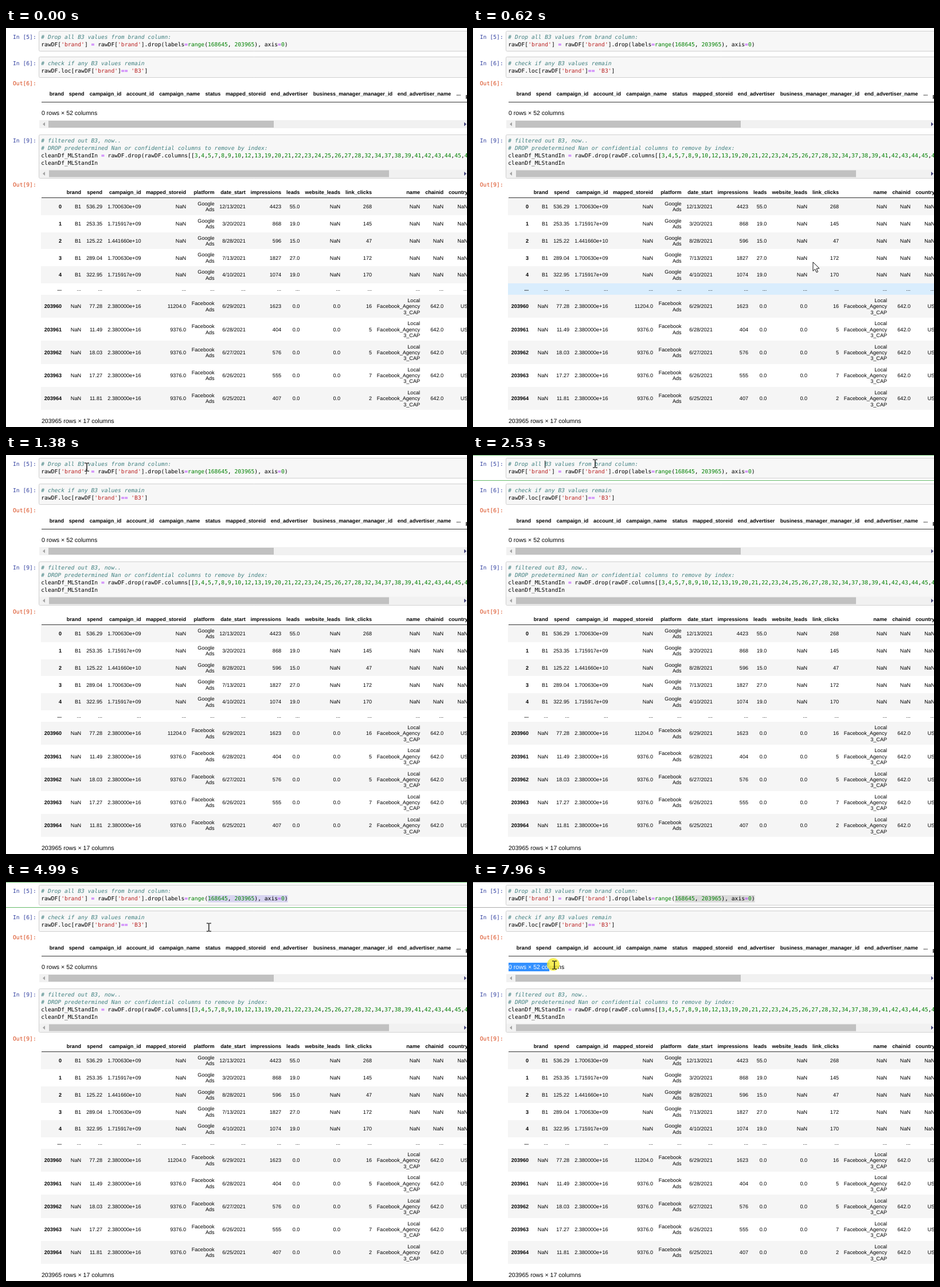
Write an HTML page with a canvas that moves like this. It is 804 px wide and 697 px high and loops after 8 s.

```html
<!DOCTYPE html>
<html lang="en">
<head>
<meta charset="utf-8">
<title>Notebook</title>
<style>
  html, body { margin: 0; width: 100%; height: 100%; overflow: hidden; background: #fff; }
  canvas { display: block; }
</style>
</head>
<body>
<canvas id="stage" width="804" height="697"></canvas>
<script>
const ctx = document.getElementById('stage').getContext('2d');
const W = 804, H = 697, LOOP = 8000;
const MONO = '9.67px "DejaVu Sans Mono", monospace';
const SANS = '"Liberation Sans", Arial, sans-serif';
const CELL = '9.08px ' + SANS, HEAD = 'bold ' + CELL, NOTE = '10.57px ' + SANS;
const CODE_X = 61.3, CODE_LEN = 74;
const FOCUS = 2190, DRAG = 3710, DROP = 4580, BLUR = 7480;

// Pointer path: time, x, y
const path = [
  [480, 720, 650], [550, 655, 525], [620, 594, 410], [760, 450, 260], [960, 240, 90],
  [1250, 141, 20], [1380, 141, 21], [1860, 126, 13], [2190, 126, 13], [2880, 302, 17],
  [3010, 302, 17], [3510, 531, 29], [3840, 531, 29], [4120, 131, 25], [4330, 320, 24],
  [4450, 353, 25], [4580, 353, 25], [4700, 376, 40], [4830, 385, 62], [4990, 354, 79],
  [5260, 300, 77], [5410, 298, 76], [5880, 298, 76], [6350, 38, 130], [6620, 38, 130],
  [6950, 67, 146], [7680, 66, 146], [7960, 142, 145]
];

const summary = {
  names: 'brand spend campaign_id account_id campaign_name status mapped_storeid end_advertiser business_manager_manager_id end_advertiser_name ...'.split(' '),
  right: [101, 136.5, 201.3, 258, 338.4, 374.3, 453, 526.4, 674, 776, 793]
};
const table = {
  names: ' brand spend campaign_id mapped_storeid platform date_start impressions leads website_leads link_clicks name chainid country'.split(' '),
  right: [97, 131, 168, 235.5, 314, 363.6, 417.7, 480, 512.3, 583, 638, 722, 763, 805.3]
};

const topRow = s => {
  const [id, spend, campaign, date, views, leads, clicks] = s.split(' ');
  return [id, 'B1', spend, campaign, 'NaN', 'Google\nAds', date, views, leads, 'NaN', clicks, 'NaN', 'NaN', 'NaN'];
};
const endRow = s => {
  const [id, spend, store, date, views, clicks] = s.split(' ');
  return [id, 'NaN', spend, '2.380000e+16', store, 'Facebook\nAds', date, views, '0.0', '0.0', clicks,
    'Local\nFacebook_Agency\n3_CAP', '642.0', 'US'];
};
const rows = [
  ...[
    '0 536.29 1.700630e+09 12/13/2021 4423 55.0 268',
    '1 253.35 1.715917e+09 3/20/2021 868 19.0 145',
    '2 125.22 1.441660e+10 8/28/2021 596 15.0 47',
    '3 289.04 1.700630e+09 7/13/2021 1827 27.0 172',
    '4 322.95 1.715917e+09 4/10/2021 1074 19.0 170'
  ].map(topRow),
  Array(14).fill('...'),
  ...[
    '203960 77.28 11204.0 6/29/2021 1623 16',
    '203961 11.49 9376.0 6/28/2021 404 5',
    '203962 18.03 9376.0 6/27/2021 576 5',
    '203963 17.27 9376.0 6/26/2021 555 7',
    '203964 11.81 9376.0 6/25/2021 407 2'
  ].map(endRow)
];
const rowTop = i => i < 6 ? 297 + 29.8 * i : 466 + 40.2 * (i - 6);

function rect(x, y, w, h, color) {
  ctx.fillStyle = color;
  ctx.fillRect(x, y, w, h);
}

function text(s, x, y, font, color = '#000', align = 'left') {
  ctx.font = font;
  ctx.fillStyle = color;
  ctx.textAlign = align;
  ctx.fillText(s, x, y);
}

function shape(points, fill, stroke) {
  ctx.beginPath();
  points.forEach(([x, y]) => ctx.lineTo(x, y));
  ctx.closePath();
  ctx.fillStyle = fill;
  ctx.fill();
  if (stroke) {
    ctx.strokeStyle = stroke;
    ctx.stroke();
  }
}

function box(y, h) {
  ctx.beginPath();
  ctx.roundRect(57.5, y + .5, 800, h - 1, 2);
  ctx.fillStyle = '#f7f7f7';
  ctx.fill();
  ctx.strokeStyle = '#cfcfcf';
  ctx.stroke();
}

function tokenColor(s) {
  if (s[0] === '#') return '#408080';
  if (s[0] === "'") return '#ba2121';
  if (s[0] === '=') return '#aa22ff';
  return /^\d|^range$/.test(s) ? '#008000' : '#000';
}

function code(line, y) {
  let x = CODE_X;
  for (const s of line.match(/#.*|'[^']*'|\d+|=+|range|[a-z_]+|[^\w'=]+/gi)) {
    const font = s[0] === '#' ? 'italic ' + MONO : MONO;
    text(s, x, y, font, tokenColor(s));
    x += ctx.measureText(s).width;
  }
}

function charWidth() {
  ctx.font = MONO;
  return ctx.measureText('0').width;
}

function scrollbar(y, x, w) {
  rect(58, y, W, 14, '#f1f1f1');
  rect(x, y + 1, w, 12, '#c1c1c1');
  shape([[64, y + 7], [68, y + 3.5], [68, y + 10.5]], '#a3a3a3');
  shape([[803, y + 7], [799, y + 3.5], [799, y + 10.5]], '#45457c');
}

function pointerAt(t) {
  if (t < path[0][0]) return null;
  const i = path.findIndex(p => p[0] > t);
  if (i < 0) return path[path.length - 1].slice(1);
  const [t0, x0, y0] = path[i - 1], [t1, x1, y1] = path[i];
  const k = (t - t0) / (t1 - t0);
  return [x0 + (x1 - x0) * k, y0 + (y1 - y0) * k];
}

function firstCell(t, lag) {
  if (t >= FOCUS) {
    const edge = t < BLUR ? '#66bb6a' : '#ababab';
    rect(0, 0, W, 1, edge);
    rect(0, 44, W, 1, edge);
  }
  box(5, 36);
  const cw = charWidth(), end = CODE_X + CODE_LEN * cw;
  if (t >= DRAG) {
    const x = t < DROP ? lag[0] : 353;
    const from = CODE_X + Math.min(CODE_LEN, Math.floor((x - CODE_X) / cw)) * cw;
    if (from < end) rect(from, 23, end - from, 12.5, t < BLUR ? '#d7d4f0' : '#d9d9d9');
    else rect(end, 23, 1, 12.5, '#000');
  } else if (t >= FOCUS && t < FOCUS + 530) {
    rect(CODE_X + 11 * cw, 10, 1, 12.5, '#000');
  }
  prompt('In [5]:', 19, '#303f9f');
  code('# Drop all B3 values from brand column:', 19);
  code("rawDF['brand'] = rawDF['brand'].drop(labels=range(168645, 203965), axis=0)", 32);
}

function prompt(s, y, color) {
  text(s, 12, y, MONO, color);
}

function secondCell(t, pos, lag) {
  box(50, 37);
  prompt('In [6]:', 65.3, '#303f9f');
  code('# check if any B3 values remain', 65.3);
  code("rawDF.loc[rawDF['brand']== 'B3']", 77.8);

  if (pos && pos[0] < 57 && pos[1] > 87 && pos[1] < 177) {
    ctx.beginPath();
    ctx.roundRect(12.5, 88, 44, 88.5, 4);
    ctx.fillStyle = 'rgba(240,240,240,.5)';
    ctx.fill();
    ctx.strokeStyle = '#8c8c8c';
    ctx.stroke();
  }
  prompt('Out[6]:', 100.3, '#d84315');
  summary.names.forEach((s, i) => text(s, summary.right[i], 118.2, HEAD, '#000', 'right'));
  text('p', 801.5, 122, HEAD);
  rect(62, 129, W, 1, '#333');

  const note = '0 rows × 52 columns';
  text(note, 62, 152, NOTE);
  if (t >= BLUR + 200) {
    ctx.save();
    ctx.beginPath();
    ctx.rect(62, 141, lag[0] - 63, 15);
    ctx.clip();
    rect(62, 141, 200, 15, '#3390ff');
    text(note, 62, 152, NOTE, '#fff');
    ctx.restore();
  }
  scrollbar(161, 74, 393);
}

function thirdCell() {
  box(186, 77);
  prompt('In [9]:', 200.3, '#303f9f');
  code('# filtered out B3, now..', 200.3);
  code('# DROP predetermined Nan or confidential columns to remove by index:', 213.3);
  code('cleanDf_MLStandIn = rawDF.drop(rawDF.columns[[3,4,5,7,8,9,10,12,13,19,20,21,22,23,24,25,26,27,28,32,34,37,38,39,41,42,43,44,45,46', 226.3);
  code('cleanDf_MLStandIn', 239);
  scrollbar(247.5, 75, 593);
}

function dataTable(lag) {
  prompt('Out[9]:', 277.3, '#d84315');
  table.names.forEach((s, i) => text(s, table.right[i], 290.2, HEAD, '#000', 'right'));
  rect(62, 296, W, 1, '#333');
  rows.forEach((row, i) => {
    const y0 = rowTop(i), y1 = rowTop(i + 1);
    const hover = lag && lag[0] > 61 && lag[1] >= y0 && lag[1] < y1;
    const top = Math.round(y0);
    if (hover || i % 2 === 0) rect(61, top, W, Math.round(y1) - top, hover ? '#d9edfd' : '#f5f5f5');
    row.forEach((s, c) => {
      const lines = s.split('\n');
      const y = (y0 + y1) / 2 + 3.3 - (lines.length - 1) * 5.15;
      lines.forEach((l, n) => text(l, table.right[c], y + n * 10.3, c ? CELL : HEAD, '#000', 'right'));
    });
  });
  text('203965 rows × 17 columns', 62, 689.5, NOTE);
}

function beam() {
  rect(-.7, -7, 1.4, 14, '#111');
  for (const y of [-7.5, 6.5]) {
    rect(-4, y, 3.4, 1.2, '#111');
    rect(.6, y, 3.4, 1.2, '#111');
  }
}

function arrow() {
  shape([[0, 0], [0, 15.5], [3.6, 12.2], [6.2, 18], [8.6, 16.9], [6.1, 11.3], [11, 11]], '#fff', '#111');
}

function hand() {
  shape([[-1, 0], [1, 0], [1.5, 6], [8, 8], [9, 11], [7, 17], [0, 17], [-5, 10], [-4, 8], [-1.5, 10]], '#fff', '#111');
}

function pointer(t, [x, y]) {
  if ((t >= FOCUS && t < FOCUS + 200) || (t >= DRAG && t < DROP) || t >= BLUR) {
    ctx.beginPath();
    ctx.arc(x - 2, y - 1, 11, 0, Math.PI * 2);
    ctx.fillStyle = 'rgba(244,234,45,.8)';
    ctx.fill();
  }
  const overText = y < 90 || (y > 138 && y < 158) || (y > 188 && y < 246);
  ctx.save();
  ctx.translate(x, y);
  if (x < 57) hand();
  else if (overText) beam();
  else arrow();
  ctx.restore();
}

function draw(t) {
  const pos = pointerAt(t), lag = pointerAt(t - 30);
  ctx.textRendering = 'geometricPrecision';
  ctx.lineWidth = 1;
  rect(0, 0, W, H, '#fff');
  firstCell(t, lag);
  secondCell(t, pos, lag);
  thirdCell();
  dataTable(lag);
  if (pos) pointer(t, pos);
}

const start = performance.now();
function tick() {
  draw((performance.now() - start) % LOOP);
  requestAnimationFrame(tick);
}
tick();
</script>
</body>
</html>
```
